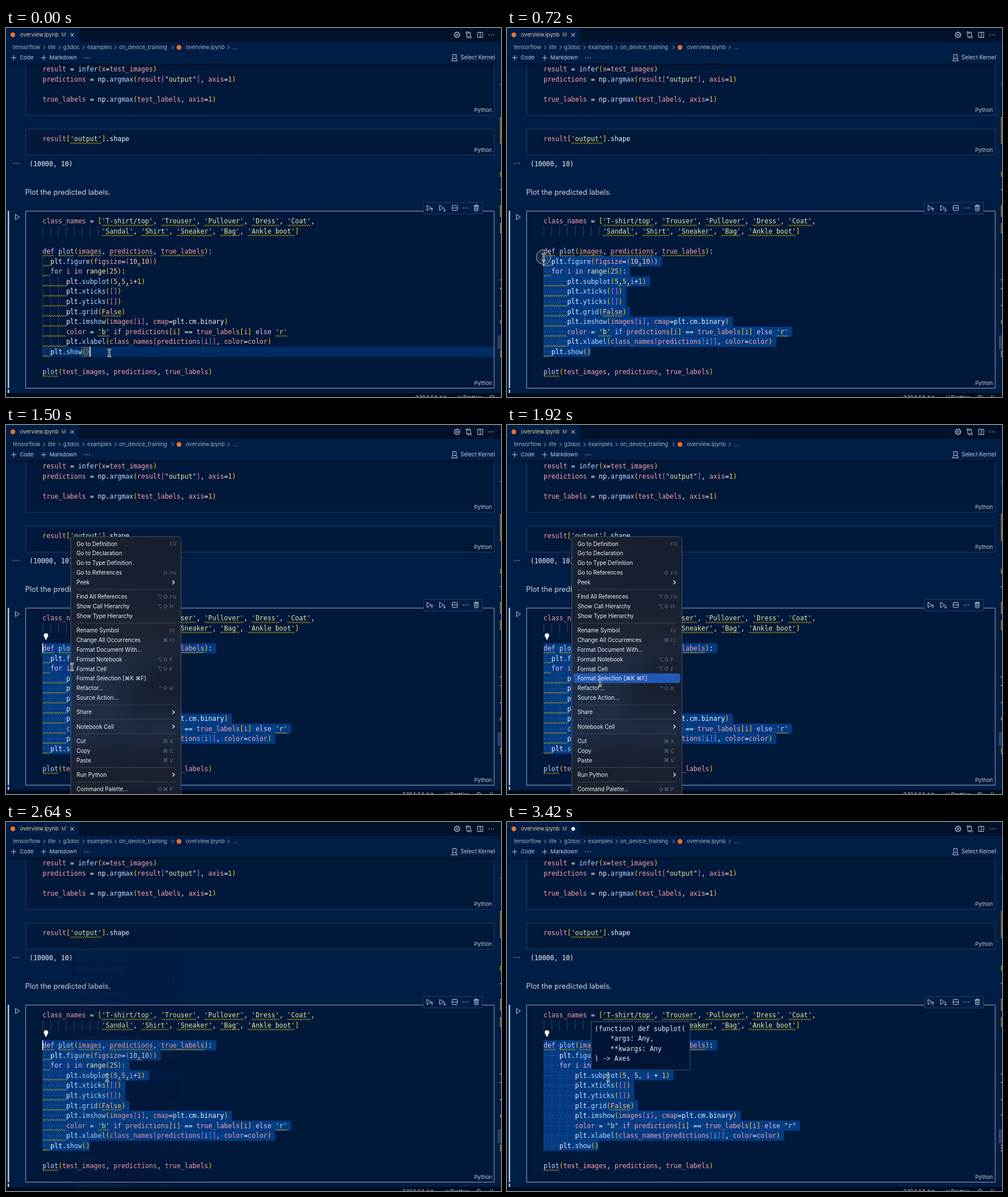
Write an HTML page with a canvas that moves like this. It is 867 px wide and 646 px high and loops after 3.48 s.

```html
<!DOCTYPE html>
<html lang="en">
<head>
<meta charset="utf-8">
<title>Format selection</title>
<style>
html, body { margin: 0; width: 100%; height: 100%; overflow: hidden; background: #001d45; }
canvas { display: block; width: 867px; height: 646px; }
</style>
</head>
<body>
<canvas id="stage"></canvas>
<script>
const W = 867, H = 646, LOOP = 3480, STEP = 60;
const canvas = document.getElementById('stage');
const ctx = canvas.getContext('2d');
const ratio = window.devicePixelRatio || 1;
canvas.width = W * ratio;
canvas.height = H * ratio;

const MONO = '"DejaVu Sans Mono", monospace';
const SANS = 'Inter, "DejaVu Sans", sans-serif';
const CODE_SIZE = 11.48, CHAR = 6.911, LEFT = 64, ROW = 17.6, FIRST = 338;
const C = {
  page: '#001d45', cell: '#00183a', bar: '#001129', status: '#000b20',
  white: '#f2f5fa', ui: '#c3cedd', edge: '#233e66',
  pink: '#f7a0a8', blue: '#bbdaff', green: '#dcefa6', orange: '#ffc58f',
  purple: '#e6bbfa', type: '#ffeead', squiggle: '#c3a90f', select: '#023b82',
  logo: '#e8712b'
};
const BRACKETS = ['#ffd700', '#da70d6', '#2a9fff'];

const INTRO = ['result = infer(x=test_images)',
  'predictions = np.argmax(result["output"], axis=1)', '',
  'true_labels = np.argmax(test_labels, axis=1)'];
const SOURCE = [
  "class_names = ['T-shirt/top', 'Trouser', 'Pullover', 'Dress', 'Coat',",
  "               'Sandal', 'Shirt', 'Sneaker', 'Bag', 'Ankle boot']",
  '',
  'def plot(images, predictions, true_labels):',
  '  plt.figure(figsize=(10,10))',
  '  for i in range(25):',
  '      plt.subplot(5,5,i+1)',
  '      plt.xticks([])',
  '      plt.yticks([])',
  '      plt.grid(False)',
  '      plt.imshow(images[i], cmap=plt.cm.binary)',
  "      color = 'b' if predictions[i] == true_labels[i] else 'r'",
  '      plt.xlabel(class_names[predictions[i]], color=color)',
  '  plt.show()',
  '',
  'plot(test_images, predictions, true_labels)'];
const LAST = 13;
const tidy = (s, row) => row < 3 || row > LAST ? s : s
  .replace(/^ +/, '$&  ').replace(/,(?=\S)/g, ', ')
  .replace('i+1', 'i + 1').replace(/'/g, '"');
const TIDY = SOURCE.map(tidy);

// '-' is a separator; "label|modifiers|key", and '>' marks a submenu
const MENU = ['Go to Definition||F12', 'Go to Declaration', 'Go to Type Definition',
  'Go to References|⇧|F12', 'Peek|>', '-', 'Find All References|⌥⇧|F12',
  'Show Call Hierarchy|⌥⇧|H', 'Show Type Hierarchy', '-', 'Rename Symbol||F2',
  'Change All Occurrences|⌘|F2', 'Format Document With...', 'Format Notebook|⌥⇧|F',
  'Format Cell|⌥⇧|F', 'Format Selection [⌘K ⌘F]', 'Refactor...|⌃⇧|R', 'Source Action...',
  '-', 'Share|>', '-', 'Notebook Cell|>', '-', 'Cut|⌘|X', 'Copy|⌘|C', 'Paste|⌘|V',
  '-', 'Run Python|>', '-', 'Command Palette...|⇧⌘|P'];

// time, x, y
const MOUSE = [[0, 181, 569], [120, 181, 569], [300, 148, 567], [360, 148, 567],
  [690, 64, 401], [780, 64, 401], [900, 64, 398], [1020, 64, 401], [1200, 64, 401],
  [1440, 113, 422], [1560, 118, 425], [1920, 163, 451], [2220, 177, 448], [LOOP, 177, 448]];
const PRESS = 300, RELEASE = 960, MENU_OPEN = 1500, MENU_CLOSE = 2545, FORMAT = 2880, HOVER = 3060;

const ease = k => k * k * (3 - 2 * k);
const rowY = row => FIRST + row * ROW;
const colX = col => LEFT + col * CHAR;

function mouseAt(t) {
  const i = MOUSE.findIndex((m, n) => n && t <= m[0]);
  const [t0, x0, y0] = MOUSE[i - 1], [t1, x1, y1] = MOUSE[i];
  const k = ease((t - t0) / (t1 - t0));
  return { x: x0 + (x1 - x0) * k, y: y0 + (y1 - y0) * k };
}

function text(s, x, y, color = C.ui, size = 9.7, align = 'left', family = SANS) {
  ctx.font = `${size}px ${family}`;
  ctx.textAlign = align;
  ctx.fillStyle = color;
  ctx.fillText(s, x, y + size * 0.36);
}
const mono = (s, x, y, color) => text(s, x, y, color, CODE_SIZE, 'left', MONO);

function box(x, y, w, h, fill, stroke, radius = 0) {
  ctx.beginPath();
  ctx.roundRect(x, y, w, h, radius);
  if (fill) { ctx.fillStyle = fill; ctx.fill(); }
  if (stroke) { ctx.strokeStyle = stroke; ctx.lineWidth = 1; ctx.stroke(); }
}

function line(points, color = C.ui, width = 1, close = false) {
  ctx.beginPath();
  points.forEach(([x, y]) => ctx.lineTo(x, y));
  if (close) ctx.closePath();
  ctx.strokeStyle = color;
  ctx.lineWidth = width;
  ctx.stroke();
}

function disc(x, y, r, fill, stroke, width = 1) {
  ctx.beginPath();
  ctx.arc(x, y, r, 0, Math.PI * 2);
  if (fill) { ctx.fillStyle = fill; ctx.fill(); }
  if (stroke) { ctx.strokeStyle = stroke; ctx.lineWidth = width; ctx.stroke(); }
}

const dots = (x, y) => [-4, 0, 4].forEach(d => disc(x + d, y, 0.85, C.ui));
const plus = (x, y) => {
  line([[x - 4.5, y], [x + 4.5, y]]);
  line([[x, y - 4.5], [x, y + 4.5]]);
};
const chevron = (x, y, color = C.ui) => line([[x - 1.8, y - 3], [x + 1.5, y], [x - 1.8, y + 3]], color);

function squiggle(x, y, width) {
  const points = [];
  for (let d = 0; d <= width; d += 0.5) points.push([x + d, y - 1.2 * Math.cos(d * Math.PI / 2.1)]);
  line(points, C.squiggle, 1);
}

function wordColor(word, next) {
  if (/^(def|for|in|if|else)$/.test(word)) return C.purple;
  if (word === 'False') return C.orange;
  if (word === 'range') return C.type;
  if (/^(np|plt|cm|shape|binary)$/.test(word)) return C.white;
  return next === '(' ? C.blue : C.pink;
}

function code(s, y, depth = 0) {
  for (const m of s.matchAll(/'[^']*'|"[^"]*"|\d+|\w+|[^\s\w]/g)) {
    const token = m[0];
    let color = C.white;
    if (/^['"]/.test(token)) color = C.green;
    else if (/^\d/.test(token)) color = C.orange;
    else if (/^\w/.test(token)) color = wordColor(token, s[m.index + token.length]);
    else if (/[(\[]/.test(token)) color = BRACKETS[depth++ % 3];
    else if (/[)\]]/.test(token)) color = BRACKETS[--depth % 3];
    mono(token, colX(m.index), y, color);
  }
}

function underline(s, y, pattern) {
  for (const m of s.matchAll(pattern)) squiggle(colX(m.index), y + 7.6, m[0].length * CHAR);
}

function header(dirty) {
  box(0, 0, W, 62, C.page);
  box(128, 0, W - 128, 24, C.bar);
  disc(12, 12, 4.2, C.logo);
  text('overview.ipynb', 24.5, 12, '#e0cc9f', 9.5);
  text('M', 97, 12, '#b8a780', 9);
  if (dirty) disc(116, 12, 3.2, C.white);
  else {
    line([[112.8, 8.8], [119.2, 15.2]], C.white);
    line([[119.2, 8.8], [112.8, 15.2]], C.white);
  }

  disc(790, 12, 4.3, null, C.ui, 1.2);
  disc(790, 12, 1.5, null, C.ui);
  for (let a = 0; a < 8; a++) {
    const c = Math.cos(a * Math.PI / 4), s = Math.sin(a * Math.PI / 4);
    line([[790 + 4 * c, 12 + 4 * s], [790 + 5.6 * c, 12 + 5.6 * s]], C.ui, 1.4);
  }
  disc(807, 8, 1.6, null, C.ui);
  disc(813.5, 16, 1.6, null, C.ui);
  line([[807, 10], [807, 16], [811, 16]]);
  line([[813.5, 14], [813.5, 8], [809.5, 8]]);
  line([[811.5, 6], [809.5, 8], [811.5, 10]]);
  line([[809, 14], [811, 16], [809, 18]]);
  box(826, 7.5, 9, 9, null, C.ui);
  line([[830.5, 7.5], [830.5, 16.5]]);
  dots(850, 12);

  const crumb = '#a3b2c7';
  [['tensorflow', 12, 67], ['lite', 73.5, 94], ['g3doc', 100, 136], ['examples', 142, 192],
    ['on_device_training', 198, 292], ['overview.ipynb', 315, 390], ['...', 397]].forEach(([s, x, arrow]) => {
    text(s, x, 34, crumb, 9.6);
    if (arrow) chevron(arrow, 34, crumb);
  });
  disc(303, 34, 4.2, C.logo);

  plus(13.5, 52);
  text('Code', 24, 52, C.ui, 9.6);
  plus(66, 52);
  text('Markdown', 76, 52, C.ui, 9.6);
  dots(142, 52);
  box(782.5, 46.5, 6, 7, null, C.ui);
  line([[782.5, 53.5], [780.5, 57.5], [790.5, 57.5], [788.5, 53.5]]);
  text('Select Kernel', 796, 52, C.ui, 9.7);

  const shade = ctx.createLinearGradient(0, 62, 0, 66);
  shade.addColorStop(0, 'rgba(0,8,26,.75)');
  shade.addColorStop(1, 'rgba(0,8,26,0)');
  box(0, 62, 861, 4, shade);
}

function cell(top, bottom, edge = C.edge) {
  box(34.5, top + 0.5, 820.5, bottom - top, C.cell, edge);
  text('Python', 851, bottom - 8.5, C.ui, 9.3, 'right');
}

function cellToolbar() {
  box(731.5, 305.5, 103, 20, C.page, C.edge);
  [742, 764].forEach((x, i) => {
    line([[x - 4.5, 310.5], [x + 2.5, 315], [x - 4.5, 319.5]], C.ui, 1, true);
    const tip = i ? 321 : 315, back = i ? -2 : 2;
    line([[x + 4, 315], [x + 4, 321]]);
    line([[x + 2, tip + back], [x + 4, tip], [x + 6, tip + back]]);
  });
  box(781.5, 310.5, 9, 9, null, C.ui, 1);
  line([[781.5, 315], [790.5, 315]]);
  dots(805, 315);
  box(820.5, 312, 6.5, 8, null, C.ui, 1);
  line([[819, 311.5], [828.5, 311.5]]);
  line([[822, 311], [822, 309.8], [825.5, 309.8], [825.5, 311]]);
  line([[822.7, 313.5], [822.7, 318.5]]);
  line([[824.9, 313.5], [824.9, 318.5]]);
}

function ruler(formatted) {
  box(861, 538, 6, 24, '#27426c');
  const marks = [[156, 204], [252, 259], [282, 283], [310, 330], [342, 358], [440, 441],
    [455, 456], [485, 486], [512, 517], [565, 577]];
  for (const [a, b] of marks)
    for (let y = a; y < b; y += formatted && a > 500 ? 5 : 3) box(865, y, 2, 2, '#a9952e');
  box(865, 98, 2, 2, '#496689');
}

function statusBar(selected) {
  box(0, 639, W, 7, C.status);
  const x = selected ? -23 : 0;
  text('3.10.1 64-bit', 717 + x, 647.5);
  text('// Prettier', 791 + x, 647.5);
  disc(851 + x, 647, 3.6, null, C.ui);
  if (selected) text('{}', 846, 647.5);
}

// Selected span: from head (row, col) to the end of the last body line.
function headAt(t, mouse) {
  if (t >= RELEASE) return { row: 3, col: 0 };
  const row = Math.max(3, Math.min(LAST, Math.floor((mouse.y - FIRST) / ROW + 0.5)));
  const col = Math.max(0, Math.min(SOURCE[row].length, Math.round((mouse.x - LEFT) / CHAR)));
  return { row, col };
}

function selection(rows, head) {
  for (let r = head.row; r <= LAST; r++) {
    const from = r === head.row ? head.col : 0;
    const to = rows[r].length + (r < LAST ? 1 : 0);
    if (to <= from) continue;
    box(colX(from), rowY(r) - 8.8, (to - from) * CHAR, ROW + 0.2, C.select, null, 2);
    for (let c = from; c < rows[r].length; c++)
      if (rows[r][c] === ' ') disc(colX(c + 0.5), rowY(r), 0.7, '#6385b5');
  }
}

function editor(t, mouse, formatted) {
  const rows = formatted ? TIDY : SOURCE;
  const selecting = t > PRESS + STEP;
  const head = selecting ? headAt(t, mouse) : { row: LAST, col: rows[LAST].length };
  if (selecting) selection(rows, head);
  else {
    box(LEFT, rowY(LAST) - 8.8, 790, ROW, '#002e64');
    [10, 11].forEach(c => box(colX(c), rowY(LAST) - 8, CHAR, 16, null, '#64748a'));
  }

  rows.forEach((s, r) => {
    const y = rowY(r), indent = s.search(/\S/);
    for (let c = 0; c < indent; c += 2)
      box(colX(c), y - 8.8, 0.8, ROW, r === 1 ? '#35557f' : '#2b4a75');
    code(s, y, r === 1 ? 1 : 0);
    if (r === 3) underline(s, y, /\w+/g);
    else if (r === 15) underline(s, y, /^plot/g);
    else underline(s, y, /'[^']*'|False|,(?=[\di])/g);
    if (!formatted && r > 3) underline(s, y, /^ +/g);
  });

  const caretOn = t < RELEASE + 120 || (t < FORMAT ? t % 1000 >= 140 && t % 1000 < 650 : t - FORMAT < 500);
  if (caretOn) box(colX(head.col) - 0.5, rowY(head.row) - 8.5, 1.6, 17, '#ffffff');

  if (t >= RELEASE) {
    disc(70, 368.5, 3.9, C.white);
    box(68.3, 371, 3.4, 4.6, C.white, null, 1);
  }
  if (t >= RELEASE && t < MENU_OPEN)
    [0, 3, 5].forEach(r => line([[54, rowY(r) - 1], [57, rowY(r) + 2], [60, rowY(r) - 1]], '#6680a5'));
}

function notebook(t, mouse) {
  const formatted = t >= FORMAT;
  box(0, 0, W, H, C.page);
  cell(40, 152.5);
  INTRO.forEach((s, i) => code(s, 72 + i * ROW));
  cell(176.5, 222);
  const shape = "result['output'].shape";
  code(shape, 194);
  underline(shape, 194, /'.*'/g);
  dots(17.5, 237);
  mono('(10000, 10)', 41, 238, C.white);
  text('Plot the predicted labels.', 33.5, 287.5, '#cbd4e0', 12.8);

  cell(320, 630, '#91a8c5');
  box(3, 320, 2.5, 310.5, '#b7c7dc');
  box(3, 633, 2.5, 6, '#b7c7dc');
  line([[16.5, 326.5], [23.5, 331], [16.5, 335.5]], C.ui, 1, true);
  editor(t, mouse, formatted);
  cellToolbar();
  ruler(formatted);
  statusBar(t > PRESS + STEP);
  header(formatted);
}

// Frosted panel: the blurred page shows through a grey tint.
function frostedPanel() {
  const alpha = ctx.globalAlpha;
  ctx.save();
  ctx.beginPath();
  ctx.roundRect(113.5, 195.5, 193, 470, 5);
  ctx.clip();
  ctx.filter = `blur(${20 * ratio}px)`;
  ctx.drawImage(canvas, 0, 0, W, H);
  ctx.filter = 'none';
  ctx.globalAlpha = alpha;
  box(113, 195, 194, 471, 'rgba(33,33,40,.7)');
  ctx.restore();
  box(113.5, 195.5, 193, 470, null, '#4a5262', 5);
}

function contextMenu(mouse) {
  frostedPanel();
  let y = 208;
  for (const item of MENU) {
    if (item === '-') {
      box(123, y - 4.8, 174, 1, '#3b4352');
      y += 8.4;
      continue;
    }
    const [label, mods, key] = item.split('|');
    const active = Math.abs(mouse.y - y) < 8.42 && mouse.x > 117;
    if (active) box(116.5, y - 9, 187, 17, '#2159b4', null, 4);
    text(label, 123.5, y, '#eef1f6', 9.75);
    if (mods === '>') line([[291.5, y - 3.3], [295, y], [291.5, y + 3.3]], '#e2e6ee', 1.4);
    else if (key) {
      text(mods, 284, y, '#69748a', 9.5, 'right');
      text(key, 286.5, y + 0.5, '#69748a', key.length > 1 ? 7.6 : 9.2);
    }
    y += 16.85;
  }
}

function tooltip() {
  box(147.5, 349.5, 173, 84.5, '#001538', '#3c5578', 2);
  ['(function) def subplot(', '    *args: Any,', '    **kwargs: Any', ') -> Axes']
    .forEach((s, i) => mono(s, 153.5, 361.5 + i * ROW, '#e6edf6'));
}

function iBeam({ x, y }) {
  ['#ffffff', '#111111'].forEach((color, i) => {
    const w = i ? 1 : 2.6;
    line([[x - 3, y - 6.5], [x, y - 5], [x + 3, y - 6.5]], color, w);
    line([[x, y - 5], [x, y + 5]], color, w);
    line([[x - 3, y + 6.5], [x, y + 5], [x + 3, y + 6.5]], color, w);
    line([[x - 2, y + 1.5], [x + 2, y + 1.5]], color, w);
  });
}

function hand({ x, y }) {
  ctx.save();
  ctx.translate(x, y);
  ctx.lineJoin = 'round';
  const outline = [[-2, -6], [0, -6], [0.4, -1.5], [4.5, -0.4], [5, 3], [3.5, 7], [-1.5, 7], [-5, 1.5], [-4, 0.6], [-2, 2]];
  line(outline, '#101010', 1.6, true);
  ctx.fillStyle = '#ffffff';
  ctx.fill();
  ctx.restore();
}

function pointer(t, mouse) {
  if (t >= PRESS && t < RELEASE) {
    disc(mouse.x, mouse.y, 12.5, 'rgba(120,130,145,.18)', '#8d98a8', 1.3);
    disc(mouse.x, mouse.y, 10.8, null, 'rgba(20,30,50,.6)');
  }
  if (t >= RELEASE && t < 1300) hand(mouse);
  else iBeam(mouse);
}

function draw(t) {
  const mouse = mouseAt(t);
  ctx.setTransform(ratio, 0, 0, ratio, 0, 0);
  notebook(t, mouse);
  if (t >= MENU_OPEN) {
    ctx.globalAlpha = Math.max(0, Math.min(1, 1 - (t - MENU_CLOSE) / 100));
    if (ctx.globalAlpha > 0) contextMenu(mouse);
    ctx.globalAlpha = 1;
  }
  if (t >= HOVER) tooltip();
  pointer(t, mouse);
}

const start = performance.now();
function tick() {
  const t = (performance.now() - start) % LOOP;
  draw(Math.floor(t / STEP) * STEP);
  requestAnimationFrame(tick);
}
tick();
</script>
</body>
</html>
```
